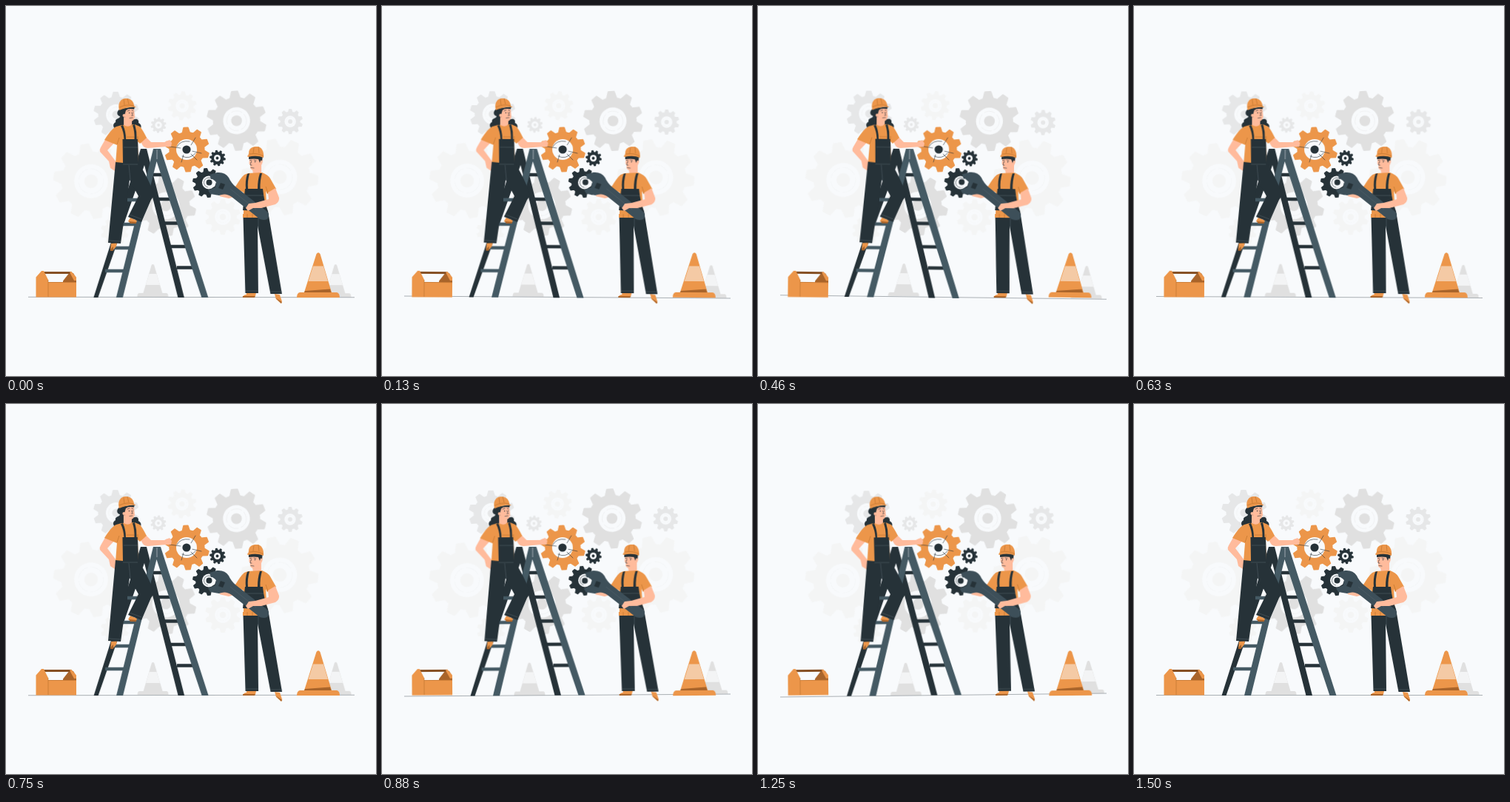
Animation, 500 px wide and 500 px high, one loop 1.54 s. Source, as an HTML page without scripts:

```html
<!DOCTYPE html>
<html lang="en">
<head>
<meta charset="utf-8">
<title>Workers with gears</title>
<style>
  html, body { margin: 0; width: 100%; height: 100%; overflow: hidden; background: #f8fafc; }
  svg { display: block; width: 100vw; height: 100vh; }
  .sway { animation: sway 1540ms linear infinite; }
  @keyframes sway {
    0%, 100% { transform: rotate(.06deg); }
    23.7% { transform: rotate(1deg); }
    71.4% { transform: rotate(-1deg); }
    97.4% { transform: rotate(0deg); }
  }
  .back { transform-origin: 266px 254px; }
  .floor { transform-origin: 250px 393.5px; }
  .parts { transform-origin: 255px 212px; }
  .climber { transform-origin: 196px 259px; }
  .holder { transform-origin: 320px 295px; }
  .box { transform-origin: 68px 376px; }
  .cone { transform-origin: 422px 364px; }
  .paper { fill: #f8fafc; }
  .dark { fill: #263238; }
  .slate { fill: #455a64; }
  .orange { fill: #ec964a; }
  .brown { fill: #a9642a; }
  .skin { fill: #ffbb9c; }
  .line { fill: none; stroke: #263238; stroke-width: .6; stroke-linecap: round; }
  .seam { fill: none; stroke: #b96f2b; stroke-width: .6; }
  .stitch { fill: none; stroke: #56656c; stroke-width: .5; }
</style>
</head>
<body>
<svg viewBox="0 0 500 500">
  <defs>
    <path id="tooth" d="M-19-74L-12-98Q-11-100-9-100H9Q11-100 12-98L19-74Z"/>
    <g id="pair"><use href="#tooth"/><use href="#tooth" transform="rotate(36)"/></g>
    <g id="gear">
      <circle r="79"/>
      <use href="#pair"/>
      <use href="#pair" transform="rotate(72)"/>
      <use href="#pair" transform="rotate(144)"/>
      <use href="#pair" transform="rotate(216)"/>
      <use href="#pair" transform="rotate(288)"/>
    </g>
    <g id="wheel">
      <use href="#gear"/>
      <circle class="paper" r="45"/>
      <circle r="33" fill="none" stroke="currentColor" stroke-width="1" stroke-dasharray="38 8" opacity=".7"/>
      <circle r="18"/>
    </g>
    <g id="greyCone">
      <path fill="#e0e0e0" d="M-1.700 1Q0-1 1.700 1L13 39H18Q21 39 21 44H-21Q-21 39-18 39H-13Z"/>
      <path fill="#f3f4f5" d="M-5 13H5L9.500 28H-9.500Z"/>
    </g>
  </defs>

  <g class="sway back">
    <g fill="#f4f5f5" color="#ecedee">
      <use href="#wheel" transform="translate(115 237) rotate(26) scale(.51)"/>
      <use href="#wheel" transform="translate(370 231) rotate(23) scale(.52)"/>
      <use href="#wheel" transform="translate(238 135) rotate(5) scale(.195)"/>
      <use href="#wheel" transform="translate(293 285) scale(.24)"/>
      <use href="#wheel" transform="translate(147 305) scale(.19)"/>
    </g>
    <g fill="#e6e7e8" color="#dcdddd">
      <use href="#wheel" transform="translate(149 147) rotate(-2) scale(.31)"/>
      <use href="#wheel" transform="translate(206 161) rotate(4) scale(.105)"/>
      <use href="#wheel" transform="translate(384 156) scale(.17)"/>
    </g>
    <g fill="#e0e0e0" color="#d8d9d9">
      <use href="#wheel" transform="translate(216 270) rotate(30) scale(.41)"/>
      <use href="#wheel" transform="translate(311.500 155) rotate(-4) scale(.405)"/>
    </g>
    <use href="#greyCone" x="198.500" y="349"/>
    <use href="#greyCone" x="445.500" y="349"/>
  </g>

  <path class="sway floor" d="M30 393.500H471" stroke="#263238" stroke-width=".5" opacity=".75"/>

  <g class="sway box">
    <path class="orange" d="M57 373H95V393.500H57Z"/>
    <path class="brown" d="M77 371.500L86 360L91 361L95 368V373H77Z"/>
    <path fill="#865024" d="M50 359H88L90 362H51Z"/>
    <path class="orange" d="M88 358.500L95 366.500V371H92L86 360ZM40.500 366.500L48 358H51L57 370V393.500H40.500Z"/>
    <path class="seam" d="M57 370V393M57 373.500H95"/>
  </g>

  <g class="sway cone">
    <path class="orange" d="M419.500 335Q422 331.500 424.500 335L440 387H447Q451 388 451 394H393Q393 388 397 387H403Z"/>
    <path fill="#f4caa5" d="M415 351.500H429L435 372H408.500Z"/>
    <path class="brown" d="M404 385L438 382.500L439.500 387H403Z"/>
  </g>

  <g class="sway parts">
    <g class="orange">
      <use href="#gear" transform="translate(244.500 194) rotate(-3) scale(.305)"/>
      <circle class="paper" cx="244" cy="194" r="14"/>
      <path class="line" d="M231 190Q236 181 248 183M256 199Q248 208 238 203M236 192L221 190M250 188L256 178M249 199L258 208M240 201L237 211M251 196L264 199"/>
      <circle class="paper" cx="244" cy="194" r="8"/>
      <circle class="dark" cx="244" cy="194" r="5.600"/>
    </g>
    <g class="dark">
      <use href="#gear" transform="translate(286 205.500) rotate(-10) scale(.108)"/>
      <circle class="paper" cx="285.500" cy="205.500" r="4.500"/>
      <circle cx="285.500" cy="205.500" r="1.900"/>
      <use href="#gear" transform="translate(272 239) rotate(-7) scale(.2)"/>
      <circle class="paper" cx="274" cy="238.500" r="9"/>
      <circle class="line" cx="274" cy="238.500" r="6.500"/>
    </g>
  </g>

  <g class="sway climber">
    <path class="dark" d="M182 193H190L241 394H232.500L187 215L124.500 394H118.500Z"/>
    <path fill="none" stroke="#455a64" stroke-width="4.500" d="M164 262H188M156 295H180M145 327H172M134 358H164"/>
    <path fill="none" stroke="#263238" stroke-width="4.500" d="M199 228H216M206 261H226M213 293.500H236M222 325H246M231 353.500H255"/>
    <path class="slate" d="M199 193H209L273.500 394H264.500L203.500 210L158 394H149Z"/>
    <path stroke="#f8fafc" stroke-width=".5" d="M204 194V207"/>

    <path class="dark" d="M154 139C149 142 149 148 154 149C154 153 147 151 148 157C142 160 146 168 152 167L164 165L162 140ZM170 155C175 151 180 153 179 158C184 160 183 166 180 168L168 163Z"/>
    <path class="orange" d="M142 321L150 320L149 325L144 331L141 330ZM168 286L177 290L176 293L168 293L165 291Z"/>
    <path class="brown" d="M141 329L145 325V331H141ZM166 291L176 292V294H168Z"/>
    <path class="skin" d="M136 177L149 182L137 195L149 211L147 223L141 219L139 210L127 197Q126 194 128 191ZM180 180L188 176L196 184L214 184L221 181L224 185L223 190L217 190L192 192Q187 192 185 189Z"/>
    <path class="orange" d="M156 161L174 160L181 163Q185 168 190 178L181 186L178 183L179 213H148L150 188L133 181Q143 165 149 163Z"/>
    <path class="skin" d="M159 150L170 152V160Q166 165 159 161Z"/>
    <path class="skin" d="M159 140Q168 136 173 139L174 150Q172 157 167 156Q159 154 159 140Z"/>
    <path class="dark" d="M154 139L174 136L173 139.500Q165 138 162 141L160 148L158 151L154 148Z"/>
    <circle class="skin" cx="159.500" cy="148" r="2"/>
    <path class="orange" d="M152.500 139C151 130 156 125 161 125C169 124 173 130 173 135L176 137Q167 135 153 141Z"/>
    <path class="seam" d="M153 137Q163 132 173 135M159 126L160 134M164 125L166 133"/>
    <path class="line" d="M164 142L167 141M170 141L172 142M169.500 144L171.500 148H169.500M167 151.500L171 151"/>
    <circle class="dark" cx="166.500" cy="144.500" r=".7"/>
    <circle class="dark" cx="171.500" cy="144.500" r=".6"/>

    <path class="dark" d="M155 162L158 161Q162 170 162 180H173.500Q174 170 171 161L174 160Q177 170 176.500 180H178L179 211C183 219 194 235 199 253Q200 257 196 262L183 292L165 285L179 257L167 235L155 321L138 320L148 211L158 212L157.500 180H159.500Q159 170 155 162Z"/>
    <path class="stitch" d="M159 191H178M158 214H178M166 215L168 235M139 317L155 318M167 282L183 288"/>
    <path class="seam" d="M150 187L153 178M178 184L178 176M163 177H173"/>
  </g>

  <g class="sway holder">
    <path class="orange" d="M325 388H338L337 392L330 394H320Q321 390 325 390ZM363 389L370 390L373 399L372 402L365 396Z"/>
    <path class="brown" d="M320 392H337L336 394H320ZM364 394L373 400L372 402Z"/>
    <path class="skin" d="M310 243L320 248L312 257L301 260L288 257L295 251L305 254ZM331 208H345V227Q340 233 334 227Z"/>
    <path class="orange" d="M327 226L346 225Q354 228 357 233L365 247L353 254L351 250L353 284H321V252L309 246Q317 232 322 228Z"/>
    <path class="dark" d="M326 227L329 226Q326 237 327 247H340Q340 235 343 226L346 226Q343 236 343.500 247H347Q349 266 354 277L356 289L373 389H357.500L340 297L341 388H323.500L320.500 285H341L342 277L320 276L323 247H324Q323 236 326 227Z"/>
    <path class="stitch" d="M323 256H348M341 285V300M324 385H341M357 386H373"/>
    <path class="orange" d="M320 281H341V286H320Z"/>
    <path class="seam" d="M326 281V286M333 281V286M354 253L351 244"/>

    <path class="skin" d="M329 204H345Q348 209 346 213Q345 216 343 217Q340 223 334 222Q329 221 330 215L328.500 213Z"/>
    <path class="dark" d="M328 202H347L346 209L344 208.500L343 212L341 207Q335 206 328 207Z"/>
    <path class="orange" d="M326 203Q328 201 328 199C328 192 333 190 338 190C345 189 349 196 348 205Q339 201 327 204Z"/>
    <path class="seam" d="M329 200Q340 198 348 203M335 191L334 199M341 190L342 199"/>
    <path class="line" d="M329.500 208.500H332M335 208L338 209M331 211L330 215H332M331 218.500L335 219"/>
    <circle class="dark" cx="331.500" cy="210.500" r=".6"/>
    <circle class="dark" cx="336.500" cy="210.500" r=".7"/>

    <path fill="#3d4f59" d="M275 228L285 225Q296 224 301 232Q304 239 311 245L352 277Q358 282 353 288Q349 290 343 288L305 258Q297 252 288 256L276 254L273 249L283 245L284 237L277 234Z"/>
    <path class="paper" d="M271 235L279 234L284 238L282 244L273 246Z"/>
    <circle class="dark" cx="274.500" cy="238.500" r="4"/>
    <path class="dark" d="M290 239L296 241L293 248L287 246Z"/>
    <path class="stitch" d="M303 247L338 275"/>
    <path class="skin" d="M354 252L364 246L369 259Q370 264 364 268L345 273L334 273L327 277L324 273L328 267L337 266L355 261Z"/>
  </g>
</svg>
</body>
</html>
```
